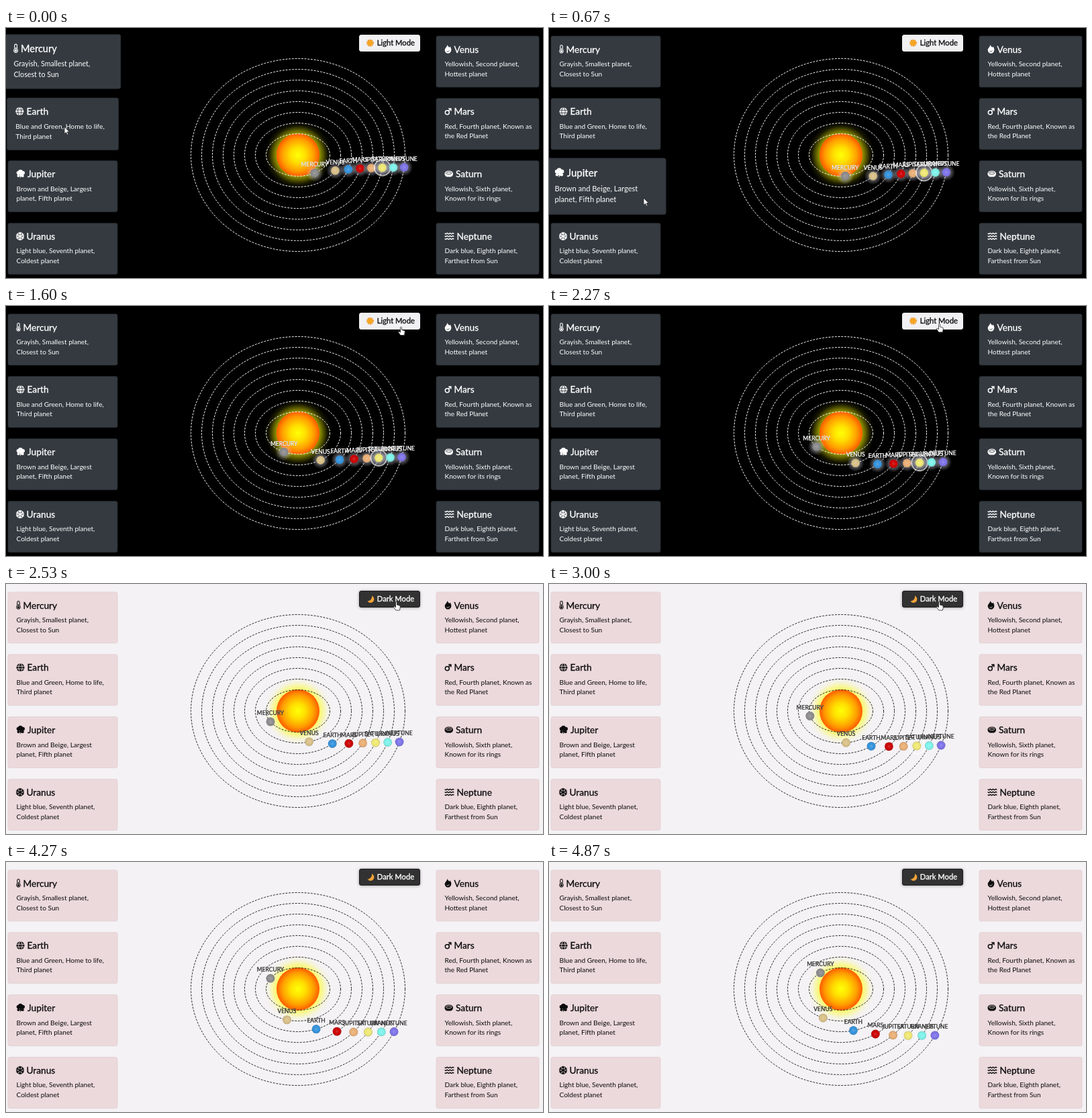
Write an HTML page that moves like this. It is 800x372 px and loops after 4940 ms.

```html
<!DOCTYPE html>
<html lang="en">
<head>
<meta charset="utf-8">
<title>Solar system</title>
<style>
  html, body { margin: 0; width: 100%; height: 100%; overflow: hidden; }
  svg {
    display: block; width: 800px; height: 372px; background: var(--page);
    font-family: Lato, "Open Sans", sans-serif;
    --page: #000; --card: #343a40; --edge: #2a2f34; --ink: #fff; --orbit: #fff;
    --label: #f4f4f4; --shade: #888; --button: #f1f0f3; --rim: #f1f0f3; --buttonInk: #111; --glow: .62;
  }
  svg.light {
    --page: #f4f2f5; --card: #ecd9dc; --edge: #dfcdd0; --ink: #0c0c0c; --orbit: #222;
    --label: #333; --shade: #aaa; --button: #303032; --rim: #1c1c1e; --buttonInk: #fff; --glow: .6;
  }
  .card rect.face { fill: var(--card); stroke: var(--edge); stroke-width: .7; }
  .card text, .solid { fill: var(--ink); }
  .line { fill: none; stroke: var(--ink); stroke-width: 1.5; stroke-linecap: round; }
  .thin { stroke-width: 1.1; }
  .cut { fill: none; stroke: var(--card); stroke-width: .9; }
  .title { font-size: 13.7px; stroke: var(--ink); stroke-width: .3px; }
  .body { font-size: 10.1px; }
  .orbit { fill: none; stroke: var(--orbit); stroke-width: 1; stroke-dasharray: 2.9 1.8; }
  .name {
    font-size: 8.5px; text-anchor: middle; fill: var(--label);
    stroke: var(--label); stroke-width: .2px;
    filter: drop-shadow(.8px .8px .5px var(--shade));
  }
  .halo { fill: url(#halo); }
  .light .halo, .light .moon-off, svg:not(.light) .moon-on { display: none; }
  .button { fill: var(--button); stroke: var(--rim); }
  .mode { font-size: 11.2px; fill: var(--buttonInk); stroke: var(--buttonInk); stroke-width: .35px; }
  .pointer path { fill: #fff; stroke: #222; stroke-width: .8; stroke-linejoin: round; }
</style>
</head>
<body>
<svg id="stage" viewBox="0 0 800 372">
  <defs>
    <radialGradient id="sun">
      <stop offset="0" stop-color="#ffff08"/>
      <stop offset=".35" stop-color="#ffe000"/>
      <stop offset=".75" stop-color="#ff9c00"/>
      <stop offset="1" stop-color="#ff5a00"/>
    </radialGradient>
    <radialGradient id="corona">
      <stop offset=".62" stop-color="#ff0"/>
      <stop offset=".74" stop-color="#ff0" stop-opacity=".6"/>
      <stop offset=".87" stop-color="#ff0" stop-opacity=".15"/>
      <stop offset="1" stop-color="#ff0" stop-opacity="0"/>
    </radialGradient>
    <radialGradient id="halo">
      <stop offset=".4" stop-color="#dde" stop-opacity=".45"/>
      <stop offset="1" stop-color="#dde" stop-opacity="0"/>
    </radialGradient>
    <radialGradient id="ball">
      <stop offset="0" stop-color="#fff" stop-opacity=".18"/>
      <stop offset=".6" stop-color="#fff" stop-opacity="0"/>
      <stop offset="1" stop-color="#000" stop-opacity=".18"/>
    </radialGradient>
    <filter id="soft" x="-20%" y="-40%" width="140%" height="200%">
      <feDropShadow dx="0" dy=".5" stdDeviation="2" flood-color="#000" flood-opacity=".35"/>
    </filter>
  </defs>
  <circle cx="435" cy="189" r="50" fill="url(#corona)" style="opacity:var(--glow)"/>
  <circle cx="435" cy="189" r="32" fill="url(#sun)"/>
  <g id="orbits"></g>
  <g id="planets"></g>
  <g id="cards"></g>
  <rect class="button" x="526.500" y="10.500" width="90" height="24" rx="2.500" filter="url(#soft)"/>
  <g class="moon-off">
    <circle cx="542.5" cy="22.3" r="4.6" fill="none" stroke="#e98a1c" stroke-width="1.6" stroke-dasharray="1.8 1.1"/>
    <circle cx="542.5" cy="22.3" r="4.2" fill="#f5a623"/>
  </g>
  <path class="moon-on" d="M545 17.500A5.400 5.400 0 1 1 538.500 25.500A6.500 6.500 0 0 0 545 17.500Z" fill="#f2a33a"/>
  <text id="mode" class="mode" x="552.800" y="26.400"></text>
  <g id="arrow" class="pointer"><path d="M0 0V10.500L2.500 8.300L4.200 12L5.800 11.200L4.200 7.700H7.500Z"/></g>
  <g id="hand" class="pointer"><path d="M-1 .8Q0-.6 1 .8V4.500L4.600 5.400Q6 5.800 5.800 7.500L5 12.500H-.8L-4 8Q-4.200 6.500-2.600 7L-1 8.300Z"/></g>
</svg>
<script>
const LOOP = 4940, STEP = 200 / 3, THEME_SWITCH = 2.46, HOVER_TIME = 0.3;
const $ = id => document.getElementById(id);
const stage = $('stage');

const icons = {
  thermometer: [6, '<path class="line thin" d="M1.300 1V-4.300a1.700 1.700 0 0 1 3.400 0V1a2.700 2.700 0 1 1-3.400 0Z"/><circle class="solid" cx="3" cy="3.200" r="1.500"/><path class="line thin" d="M3-1V3"/>'],
  globe: [12, '<circle class="solid" cx="6" r="6"/><ellipse class="cut" cx="6" rx="2.600" ry="6"/><path class="cut" d="M0-2H12M0 2H12"/>'],
  storm: [12.5, '<g class="solid"><circle cx="3" cy="-1.500" r="2.800"/><circle cx="6" cy="-3" r="3.300"/><circle cx="9.700" cy="-1.500" r="2.800"/><path d="M3-1.500H10V1.300H3Z"/><circle cx="3" cy="2.800" r="2"/><circle cx="9.300" cy="2.800" r="2"/><path d="M6 0H8.500L7.500 2.500H9L5 6.500L6 3.500H4.300Z"/></g>'],
  snow: [11, '<g class="line">' + [0, 60, 120].map(a =>
    `<path transform="translate(5.500) rotate(${a})" d="M0-5.700V5.700M-1.800-5L0-3.200L1.800-5M-1.800 5L0 3.200L1.800 5"/>`).join('') + '</g>'],
  fire: [10, '<path class="solid" d="M4-6.500C5-4 6-3.500 7-2.500L8-4C9.500-2 10 0 9.800 1.500C9.500 4.500 7.500 6.200 5 6.200S.3 4.500.2 1.500C.1-1.500 3.500-3 4-6.500Z"/><path class="cut" d="M3 3Q5 5 7 2"/>'],
  mars: [10, '<circle class="line" cx="3.800" cy="1.500" r="3"/><path class="line" d="M6-1L9.300-4.300M6.200-4.400H9.400V-1.200"/>'],
  ring: [12.5, '<rect class="solid" y="-4.500" width="12.500" height="9" rx="5.500" ry="4"/><ellipse class="cut" cx="6.200" cy="-1.300" rx="4.300" ry="1.700"/>'],
  waves: [14, [-4, 0, 4].map(y => `<path class="line" d="M.7 ${y}q1.050 1.300 2.100 0t2.100 0t2.100 0t2.100 0t2.100 0t2.100 0"/>`).join('')]
};

// name, icon, two lines of text, hover start and end in seconds
const cards = [
  ['Mercury', 'thermometer', 'Grayish, Smallest planet,', 'Closest to Sun', -1, -0.075],
  ['Venus', 'fire', 'Yellowish, Second planet,', 'Hottest planet'],
  ['Earth', 'globe', 'Blue and Green, Home to life,', 'Third planet', -0.045, 0.22],
  ['Mars', 'mars', 'Red, Fourth planet, Known as', 'the Red Planet'],
  ['Jupiter', 'storm', 'Brown and Beige, Largest', 'planet, Fifth planet', 0.3, 0.89],
  ['Saturn', 'ring', 'Yellowish, Sixth planet,', 'Known for its rings'],
  ['Uranus', 'snow', 'Light blue, Seventh planet,', 'Coldest planet'],
  ['Neptune', 'waves', 'Dark blue, Eighth planet,', 'Farthest from Sun']
];
const colors = ['#8b8b8d', '#d8bf86', '#3292dc', '#cb0000', '#e9ae74', '#efe873', '#7df2ea', '#7d72e8'];

function cardMarkup([name, icon, first, second], i) {
  const right = i % 2, width = right ? 153 : 163, [iconWidth, shape] = icons[icon];
  const cx = (right ? 641 : 3) + width / 2, cy = 50 + 92.8 * (i >> 1), left = 12.5 - width / 2;
  return `<g transform="translate(${cx} ${cy})"><g class="card">
    <rect class="face" x="${-width / 2}" y="-38" width="${width}" height="76" rx="2.500"/>
    <g transform="translate(${left} -18.500)">${shape}</g>
    <text class="title" x="${left + iconWidth + 4}" y="-13.500">${name}</text>
    <text class="body" x="${left}" y="7">${first}</text>
    <text class="body" x="${left}" y="21.500">${second}</text></g></g>`;
}

function planetMarkup(color, i) {
  const ring = i === 5 ? '<circle class="halo" r="15"/><circle r="11.800" fill="none" stroke="#fff" stroke-opacity=".65" stroke-width="1.800"/>' : '';
  return `<g><circle class="halo" r="13"/>${ring}<circle r="6.400" fill="${color}"/>
    <circle r="6.400" fill="url(#ball)"/><text class="name" y="-9.700">${cards[i][0].toUpperCase()}</text></g>`;
}

const radii = i => [47.5 + 16 * i, 31.5 + 16 * i];
$('orbits').innerHTML = colors.map((_, i) => {
  const [rx, ry] = radii(i);
  return `<ellipse class="orbit" cx="435" cy="189" rx="${rx}" ry="${ry}"/>`;
}).join('');
$('planets').innerHTML = colors.map(planetMarkup).join('');
$('cards').innerHTML = cards.map(cardMarkup).join('');
const planetNodes = [...$('planets').children];
const cardNodes = [...document.querySelectorAll('.card')];

// CSS "ease": cubic-bezier(.25, .1, .25, 1)
function ease(x) {
  if (x <= 0) return 0;
  if (x >= 1) return 1;
  const curve = (s, a, b) => 3 * a * s * (1 - s) ** 2 + 3 * b * s * s * (1 - s) + s ** 3;
  let low = 0, high = 1;
  for (let i = 0; i < 16; i++) {
    const mid = (low + high) / 2;
    if (curve(mid, .25, .25) < x) low = mid; else high = mid;
  }
  return curve(low, .1, 1);
}

// seconds, x, y
const pointerPath = [
  [0, 87, 147], [0.22, 105, 181], [0.4, 125, 218], [0.67, 141, 253], [0.76, 146, 252],
  [0.89, 174, 235], [1.4, 590, 38], [1.6, 588.5, 31], [2.27, 581.5, 26.5],
  [3.3, 581.5, 26.5], [3.67, 377.5, 75], [3.95, 370, -16]
];
function pointerAt(t) {
  const k = pointerPath.findIndex(p => p[0] > t);
  if (k < 0) return [370, -16];
  const [t0, x0, y0] = pointerPath[k - 1], [t1, x1, y1] = pointerPath[k];
  const p = (t - t0) / (t1 - t0), s = p * p * (3 - 2 * p);
  return [x0 + (x1 - x0) * s, y0 + (y1 - y0) * s];
}

function render(ms) {
  const t = Math.floor((ms + 4) / STEP) * STEP / 1000;
  const light = t >= THEME_SWITCH;
  stage.classList.toggle('light', light);
  $('mode').textContent = light ? 'Dark Mode' : 'Light Mode';

  // orbit periods are 10 s, 20 s, 30 s ...; the motion lags a little near the end
  const age = 1.625 + t - Math.max(0, t - 3.67) * 0.09;
  planetNodes.forEach((node, i) => {
    const angle = 2 * Math.PI * age / (10 * (i + 1)), [rx, ry] = radii(i);
    node.setAttribute('transform', `translate(${435 + rx * Math.cos(angle)} ${189 + ry * Math.sin(angle)})`);
  });

  cardNodes.forEach((node, i) => {
    const [start, end] = cards[i].slice(4);
    if (start === undefined) return;
    const hover = ease((t - start) / HOVER_TIME) - ease((t - end) / HOVER_TIME);
    node.setAttribute('transform', `scale(${1 + 0.1 * hover})`);
  });

  const [x, y] = pointerAt(t), onButton = x > 526 && x < 617 && y > 10 && y < 36;
  for (const id of ['arrow', 'hand']) {
    $(id).setAttribute('transform', `translate(${x} ${y})`);
    $(id).style.display = (id === 'hand') === onButton ? '' : 'none';
  }
}

function tick() {
  render(performance.now() % LOOP);
  requestAnimationFrame(tick);
}
tick();
</script>
</body>
</html>
```
